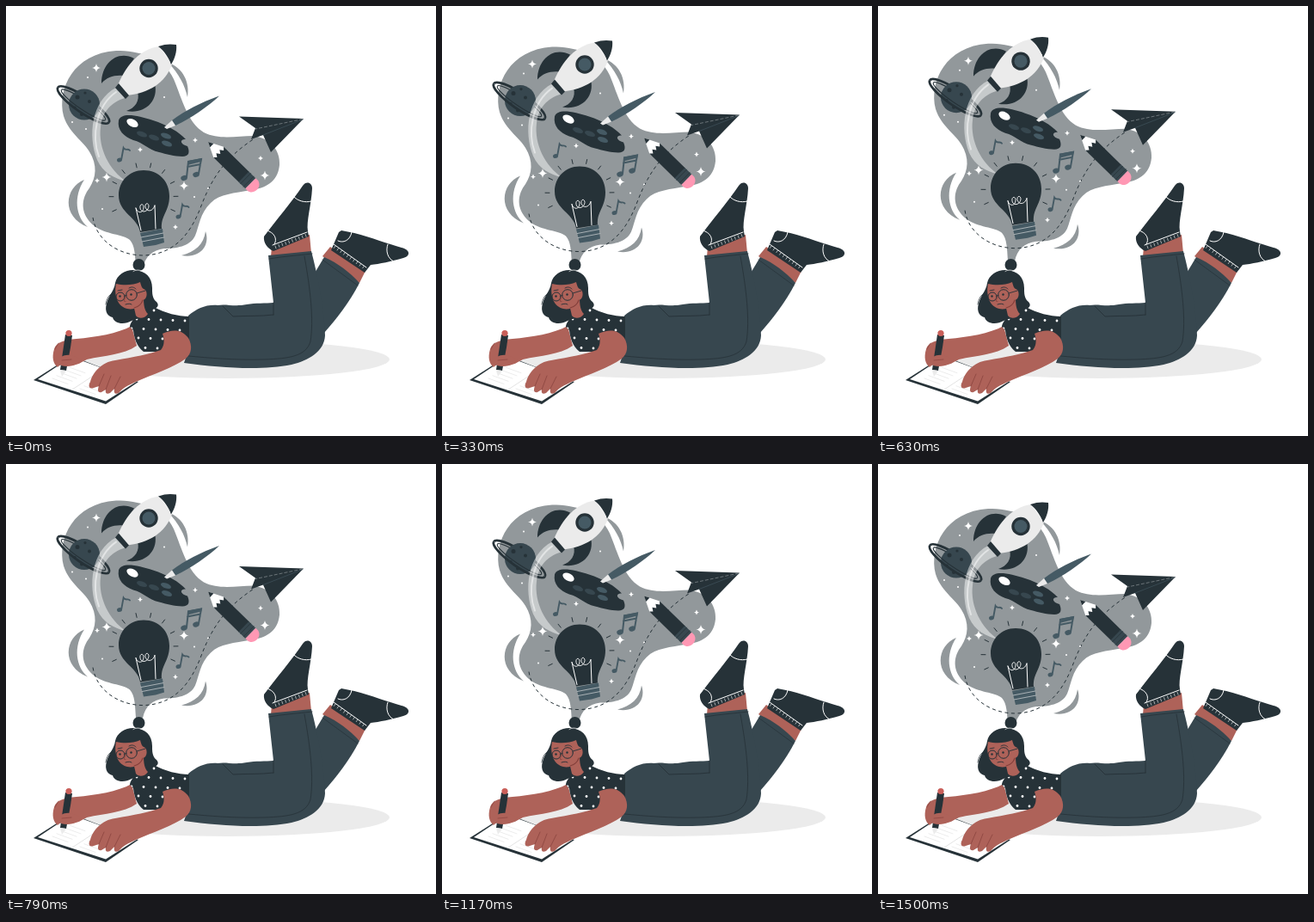
These frames come from a looping animation (500 by 500 pixels, 1.54 s). An HTML page with a canvas:

```html
<!DOCTYPE html>
<html lang="en">
<head>
<meta charset="utf-8">
<title>Creative writing</title>
<style>
html, body { margin: 0; width: 100%; height: 100%; overflow: hidden; background: #fff; }
canvas { display: block; width: 100vw; height: 100vh; }
</style>
</head>
<body>
<canvas id="stage"></canvas>
<script>
const SIZE = 500, LOOP = 1540, FLOAT = 1500, FPS = 24, LIFT = 10, REST_Y = 1;
const DARK = '#263238', SLATE = '#37474f', STEEL = '#455a64', GRAY = '#92989b',
      SKIN = '#ae6259', SKIN_LINE = '#843f3b', LIGHT = '#ebebeb', PINK = '#ff98b4', WHITE = '#fff';
const canvas = document.getElementById('stage');
const ctx = canvas.getContext('2d');

function fill(d, color) {
  ctx.fillStyle = color;
  ctx.fill(new Path2D(d));
}
function line(d, color, width = 1, dash = []) {
  ctx.strokeStyle = color;
  ctx.lineWidth = width;
  ctx.lineCap = dash.length ? 'butt' : 'round';
  ctx.setLineDash(dash);
  ctx.stroke(new Path2D(d));
  ctx.setLineDash([]);
}
function oval(x, y, rx, ry, color, tilt = 0) {
  ctx.fillStyle = color;
  ctx.beginPath();
  ctx.ellipse(x, y, rx, ry, tilt, 0, 2 * Math.PI);
  ctx.fill();
}
const dot = (x, y, r, color) => oval(x, y, r, r, color);

function placed(x, y, angle, draw) {
  ctx.save();
  ctx.translate(x, y);
  ctx.rotate(angle);
  draw();
  ctx.restore();
}
function star(x, y, r) {
  const k = r * 0.13;
  placed(x, y, 0, () => fill(`M0 ${-r}Q${k} ${-k} ${r} 0Q${k} ${k} 0 ${r}Q${-k} ${k} ${-r} 0Q${-k} ${-k} 0 ${-r}Z`, WHITE));
}

function drawCloud() {
  fill('M128 51C154 51 183 58 195 84C205 108 211 134 230 146C248 155 268 150 288 150C308 153 319 167 318 184C316 204 301 211 285 213C265 217 249 217 238 228C225 241 225 254 220 266C214 279 197 281 184 281C170 283 162 290 159 304L151 304C150 288 150 278 144 271C136 264 116 265 103 255C89 244 86 229 94 215C103 203 107 190 100 174C93 157 74 149 67 127C59 95 79 54 128 51Z', GRAY);
  fill('M91 201C68 210 64 244 95 256C81 244 78 221 91 201Z', GRAY);
  fill('M232 261C238 278 225 293 204 289C220 285 230 276 232 261Z', GRAY);
  fill('M189 65C206 71 214 88 211 105C208 91 201 78 189 65Z', GRAY);
  line('M101 245C105 271 130 289 160 289C197 288 215 262 226 234C239 199 255 175 289 153', DARK, 1, [4, 3.5]);
  [[105, 71, 5], [117, 198, 5.5], [207, 208, 5.5], [301, 196, 5.5], [156, 166, 3],
   [106, 202, 3], [220, 155, 3], [296, 176, 3], [197, 256, 3]].forEach(s => star(...s));
  [[112, 235], [219, 221], [95, 82], [77, 134], [93, 142], [184, 105], [235, 211]]
    .forEach(([x, y]) => dot(x, y, 1, WHITE));
}

function drawRing(from, to) {
  [[36, 9, 2.8], [31, 5.5, 1.2]].forEach(([rx, ry, width]) => {
    ctx.strokeStyle = DARK;
    ctx.lineWidth = width;
    ctx.beginPath();
    ctx.ellipse(90, 114, rx, ry, 0.6, from, to);
    ctx.stroke();
  });
}
function drawPlanet() {
  drawRing(Math.PI, 2 * Math.PI);
  dot(91, 113.5, 18, SLATE);
  [[83, 105, 2.5], [92, 100, 1.6], [97, 110, 2], [80, 117, 1.6], [88, 125, 2]]
    .forEach(([x, y, r]) => dot(x, y, r, DARK));
  drawRing(0, Math.PI);
}

function drawRocket() {
  fill('M128 94C99 109 95 150 106 178C113 193 125 199 140 203C120 190 107 164 110 140C112 121 123 111 138 106Z', 'rgba(255,255,255,.48)');
  line('M128 99C105 115 99 150 108 174', 'rgba(255,255,255,.5)', 2);
  fill('M149 60C130 50 111 65 111 89C117 82 126 79 136 80Z', DARK);
  fill('M173 89C178 110 161 125 140 121C150 118 156 109 153 99Z', DARK);
  fill('M178 46C156 49 140 67 130 91L141 103C166 100 185 89 193 67Z', LIGHT);
  fill('M177 46C185 43 192 43 198 44C199 52 196 61 192 67C189 59 184 51 177 46Z', DARK);
  for (let i = 0; i < 6; i++) dot(180.5 + i * 2, 51.5 + i * 2.5, 0.6, LIGHT);
  dot(166, 71.5, 10.7, DARK);
  dot(166, 71.5, 7.5, STEEL);
  fill('M131 89L143 103L139 107L127 94Z', DARK);
}

function drawPalette() {
  fill('M131 132C134 122 153 126 171 132C187 137 202 146 209 154C201 154 203 160 211 162C214 169 213 174 205 174C196 174 186 171 178 169C165 166 160 158 148 155C137 151 129 143 131 132Z', DARK);
  oval(147, 135, 7.2, 4.3, WHITE, 0.5);
  [[158, 148, SLATE], [172, 152, SLATE], [187, 159, STEEL], [186, 150, STEEL]]
    .forEach(([x, y, color]) => oval(x, y, 6.3, 2.9, color, 0.35));
  fill('M193 132C207 121 227 111 248 103.5C236 115 216 129 197 138Z', STEEL);
  fill('M193 132L197 138L187 142L184 140Z', LIGHT);
}

function drawNotes() {
  const single = (x, y) => {
    oval(x, y, 3, 2.4, STEEL, -0.3);
    line(`M${x + 2.2} ${y - 1}L${x + 4.6} ${y - 14}C${x + 7} ${y - 10} ${x + 10} ${y - 14} ${x + 12} ${y - 11}`, STEEL, 1.9);
  };
  single(132, 178);
  single(200.5, 244);
  oval(207, 199, 3.8, 3, STEEL, -0.3);
  oval(221, 195, 3.8, 3, STEEL, -0.3);
  line('M210 198L212 180L227 177L224 194M211 186L226 183', STEEL, 2);
  fill('M211 179L228 176L227 180L211 184Z', STEEL);
}

function drawBulb() {
  for (let i = 0; i < 10; i++) {
    const a = (155 + i * 25.5) * Math.PI / 180, c = Math.cos(a), s = Math.sin(a);
    line(`M${160 + 35 * c} ${221 + 35 * s}L${160 + 40 * c} ${221 + 40 * s}`, DARK);
  }
  fill('M160 190C178 190 190 203 190 220C190 238 180 242 181 258L156 262C153 244 131 240 131 219C131 203 143 190 160 190Z', DARK);
  line('M151 234L157 260M173 231L174 258', WHITE, 1);
  line('M151 234C153 241 160 240 160 233C160 228 155 229 156 234C157 240 165 239 166 232C166 227 161 228 162 233C164 239 171 238 173 231', WHITE, 0.9);
  fill('M156 263L182 258L184 274L174 277L160 279Z', STEEL);
  line('M157 268L183 263M158 273L184 268', '#b5bcbf', 0.9);
}

function drawPencil() {
  placed(235, 157, 0.775, () => {
    fill('M0 0L17 -8.5L21 -8L21 8L17 8.5Z', WHITE);
    fill('M0 0L6 -3L6 3Z', DARK);
    fill('M17 -8.5L59 -8.5L59 8.5L17 8.5L20 5.5L16 2.8L20 0L16 -2.8L20 -5.5Z', DARK);
    fill('M58 -8.5L69 -8.5L69 8.5L58 8.5Z', SLATE);
    line('M61 -8.5L61 8.5M66 -8.5L66 8.5', DARK, 0.7);
    fill('M69 -8.5L72 -8.5C82 -8 82 8 72 8.5L69 8.5Z', PINK);
  });
}

function drawPlane() {
  fill('M271 127.5L346 130L308 169L299 149L285 154L290 141Z', DARK);
  line('M345 130.5L290 142', '#9aa2a5', 0.6, [4, 2]);
  line('M345 131L299 149', STEEL, 0.6);
}

function drawLegs() {
  oval(258, 411, 188, 22, LIGHT);
  fill('M377 280L418 308L411 322L368 291Z', SKIN);
  fill('M378 284L387 263L390 261L405 264C425 269 445 277 460 281C471 284 470 291 462 293C448 297 434 300 424 301L417 310Z', DARK);
  line('M381 277L419 304', WHITE, 1);
  for (let i = 0; i < 10; i++) line(`M${383 + i * 3.7} ${279 + i * 2.6}l-1.6 2.4`, WHITE, 0.6);
  line('M402 263C400 273 392 276 386 273M444 277C441 285 444 294 451 297', WHITE, 1);
  fill('M370 292C386 299 399 309 411 322C399 345 385 363 370 380L352 350L358 312Z', SLATE);
  line('M368 295L409 325M358 310L366 352', DARK, 0.7);
  fill('M309 279L353 266L355 288L308 292Z', SKIN);
  fill('M311 285C304 282 299 275 300 268C315 248 332 228 345 209C349 203 356 205 356 212C355 232 349 250 351 262L352 268Z', DARK);
  line('M310 278L350 263', WHITE, 1);
  for (let i = 0; i < 10; i++) line(`M${313 + i * 3.9} ${279 - i * 1.5}l1 2.8`, WHITE, 0.6);
  line('M303 261C312 263 316 271 312 277M334 221C339 227 348 229 355 227', WHITE, 1);
  fill('M212 360C222 352 232 347 246 348C256 346 265 350 280 347C290 345 302 346 311 345L305 290L355 285C362 312 370 350 371 383C370 402 352 412 332 417C298 424 250 421 207 415C213 400 214 380 212 360Z', SLATE);
  line('M306 294C322 291 340 290 356 288M347 291C354 330 358 365 354 390C349 407 330 410 300 411C265 412 235 409 212 407', DARK, 0.8);
  line('M252 349L264 361C280 360 296 361 311 359M311 345L311 359', DARK, 0.9);
}

function drawBook() {
  fill('M32 435L76 407L154 437L116 463Z', DARK);
  fill('M37 434L76 408L153 436L116 459.5Z', WHITE);
  line('M77 446L115 421', '#dcdcdc', 0.8);
  for (let i = 0; i < 5; i++) {
    line(`M${54 + i * 5} ${433 - i * 3.2}l18 6.5`, '#e0e0e0', 0.6);
    line(`M${86 + i * 5} ${445 - i * 3.2}l18 6.5`, '#e0e0e0', 0.6);
  }
}

function drawTorso() {
  fill('M146 372C130 381 104 385 82 387C68 388 58 391 56 399C53 409 55 416 60 420C64 415 68 419 75 418C83 418 88 414 94 411C115 406 136 406 152 395Z', SKIN);
  fill('M69 382L77 383L75 397L70 424L63 423Z', DARK);
  dot(73, 380.5, 3.6, '#c95f59');
  fill('M63 423L70 424L65 431Z', LIGHT);
  fill('M64 408C72 403 80 407 88 411C82 419 72 420 64 418Z', SKIN);
  line('M65 412L76 411M57 399L61 392', SKIN_LINE, 0.6);

  const shirt = 'M172 350C185 357 200 361 213 361L213 391L181 402L160 402C152 396 149 386 148 377L144 373C145 364 158 354 172 350Z';
  fill(shirt, DARK);
  ctx.save();
  ctx.clip(new Path2D(shirt));
  for (let row = 0; row < 5; row++)
    for (let col = 0; col < 7; col++)
      dot(144 + col * 14 + row % 2 * 7 + row, 353 + row * 11 + col * 0.5, 1.4, WHITE);
  ctx.restore();
  fill('M180 400C185 394 184 387 182 381C193 376 204 375 212 386C217 395 216 404 209 410C194 421 171 428 151 437C142 441 136 444 131 450C127 452 125 450 126 445L121 450C117 452 115 450 116 446L111 449C107 450 106 447 108 442L102 444C97 446 95 442 98 437C101 426 111 414 127 412C149 408 166 405 180 400Z', SKIN);
  line('M126 445L133 431M116 446L122 430M108 442L114 428', SKIN_LINE, 0.7);
}

function drawHead() {
  fill('M150 307C140 306 129 312 127 322C126 331 119 337 117 346C114 356 119 361 124 362C126 370 138 371 146 366L158 362C162 357 166 353 172 352C177 351 178 347 175 344C170 340 170 334 170 328C170 315 162 308 150 307Z', DARK);
  line('M125 333C119 336 117 341 116 347', DARK, 0.8);
  fill('M148 347L160 338C160 348 161 354 165 358C161 364 154 364 151 360Z', SKIN);
  fill('M128 323C136 325 148 325 156 321C157 325 158 328 160 329C165 330 165 341 159 342C157 349 149 354 141 352C131 350 125 338 128 323Z', SKIN);
  line('M149 351C154 350 158 346 159 342', SKIN_LINE, 1.2);
  ctx.strokeStyle = DARK;
  ctx.lineWidth = 1;
  [[133, 338, 5], [146, 336, 6.3]].forEach(([x, y, r]) => {
    ctx.beginPath();
    ctx.arc(x, y, r, 0, 2 * Math.PI);
    ctx.stroke();
    dot(x - 0.5, y - 0.5, 1.2, DARK);
  });
  line('M138 337L140 336.5M152 334L162 331M130 331L135 330M143 328C146 326 149 327 151 329M139 347C142 346 145 346 146 347', DARK, 0.9);
  line('M139 338L137 343L139 343.5', SKIN_LINE, 0.8);
  dot(154.5, 301, 7, DARK);
  line('M148 308.5C152 306 156 307 160 309', WHITE, 0.7);
}

function render(now) {
  const scale = window.devicePixelRatio || 1;
  const w = Math.round(innerWidth * scale), h = Math.round(innerHeight * scale);
  if (canvas.width !== w || canvas.height !== h) {
    canvas.width = w;
    canvas.height = h;
  }
  ctx.setTransform(w / SIZE, 0, 0, h / SIZE, 0, 0);
  ctx.fillStyle = WHITE;
  ctx.fillRect(0, 0, SIZE, SIZE);

  // Linear rise and fall, stepped at 24 frames per second.
  const step = Math.floor((now % LOOP + 5) * FPS / 1000);
  const phase = Math.min(step / FPS * 1000 / FLOAT, 1);
  const rise = LIFT * (1 - Math.abs(2 * phase - 1));

  placed(0, REST_Y - rise, 0, () => {
    [drawCloud, drawPlanet, drawRocket, drawPalette, drawNotes, drawBulb, drawPencil, drawPlane]
      .forEach(draw => draw());
  });
  [drawLegs, drawBook, drawTorso, drawHead].forEach(draw => draw());
}

const start = performance.now();
function tick() {
  render(performance.now() - start);
  requestAnimationFrame(tick);
}
tick();
</script>
</body>
</html>
```
